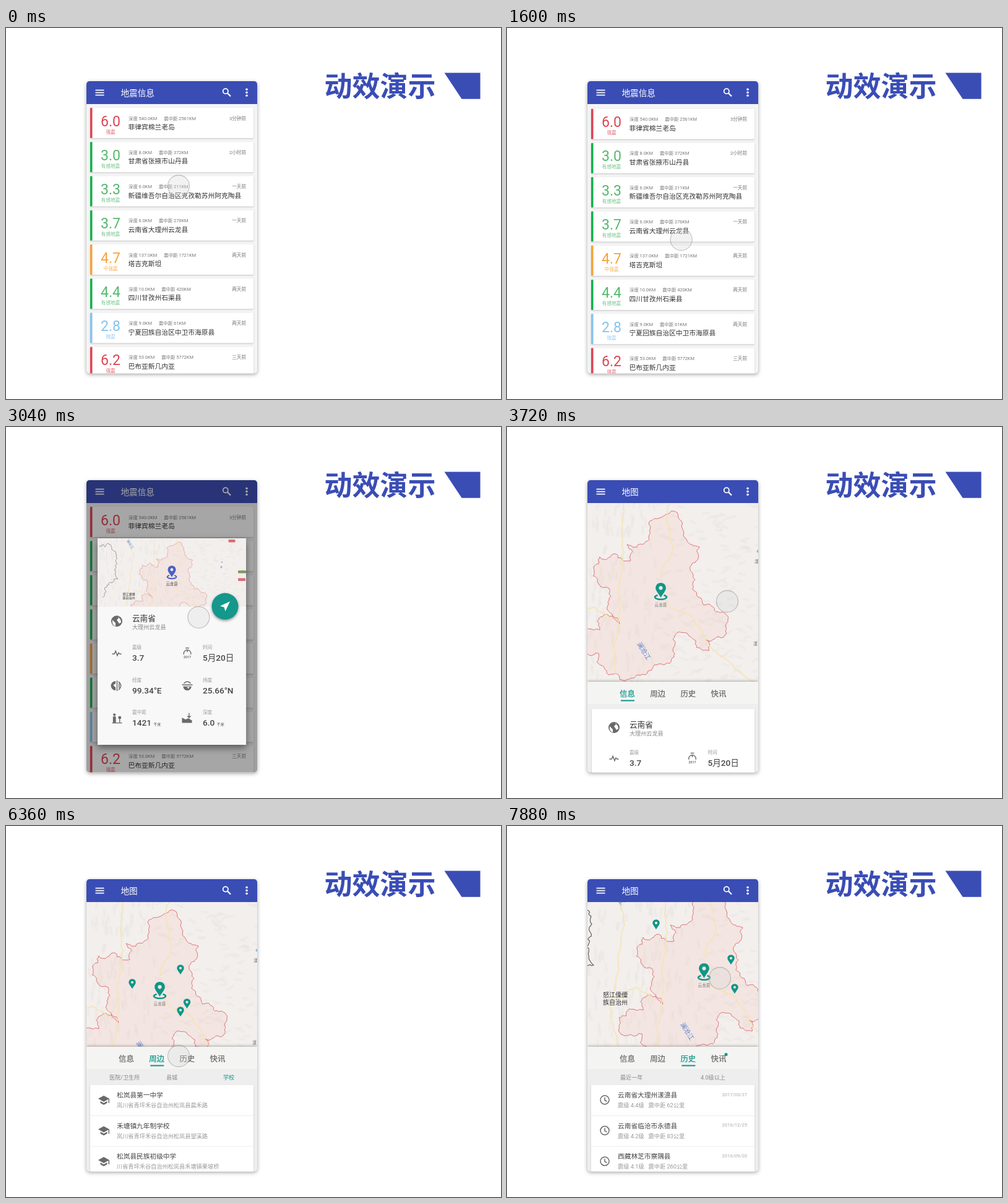
An HTML page for the animation above (8 s loop, 800 by 600 pixels).

```html
<!DOCTYPE html>
<html lang="zh-CN">
<head>
<meta charset="utf-8">
<style>
html, body { margin: 0; width: 100%; height: 100%; overflow: hidden; background: #fff; }
svg { display: block; width: 800px; height: 600px; font-family: Roboto, "Noto Sans CJK SC", "Noto Sans CJK", sans-serif; }
.card { fill: #fff; filter: drop-shadow(0 1px 1px rgba(0,0,0,.2)); }
</style>
</head>
<body>
<svg id="stage" viewBox="0 0 800 600"></svg>
<script>
const INDIGO = '#3a4db5', TEAL = '#0f9687', GRAY = '#6a6a6a';
const RED = '#dd4452', GREEN = '#12b04c', ORANGE = '#f4a33c', BLUE = '#86c3ee';

let seed = 7;
const rnd = () => (seed = seed * 16807 % 2147483647) / 2147483647;
const spread = n => (rnd() - .5) * n;

// ---- markup helpers ----
const text = (x, y, s, size, fill, weight = 400, anchor = 'start', extra = '') =>
  `<text x="${x}" y="${y}" font-size="${size}" fill="${fill}" font-weight="${weight}" text-anchor="${anchor}" ${extra}>${s}</text>`;
const rect = (x, y, w, h, fill, extra = '') =>
  `<rect x="${x}" y="${y}" width="${w}" height="${h}" fill="${fill}" ${extra}/>`;
const circle = (x, y, r, fill, extra = '') => `<circle cx="${x}" cy="${y}" r="${r}" fill="${fill}" ${extra}/>`;
const path = (d, fill, extra = '') => `<path d="${d}" fill="${fill}" ${extra}/>`;
const line = (d, color, w = 1, extra = '') => path(d, 'none', `stroke="${color}" stroke-width="${w}" ${extra}`);
const at = (x, y, body, s = 1) => `<g transform="translate(${x} ${y}) scale(${s})">${body}</g>`;
const group = (id, body) => `<g id="${id}">${body}</g>`;
const times = (n, make) => Array.from({ length: n }, (_, i) => make(i)).join('');

// Jagged line through a few points, by midpoint displacement
function rough(str, bend = .22) {
  const pts = str.split(' ').map(s => s.split(',').map(Number));
  const split = ([ax, ay], [bx, by]) => {
    const dx = bx - ax, dy = by - ay;
    if (Math.hypot(dx, dy) < 5) return `L${bx.toFixed(1)},${by.toFixed(1)}`;
    const k = spread(bend), mid = [(ax + bx) / 2 - dy * k, (ay + by) / 2 + dx * k];
    return split([ax, ay], mid) + split(mid, [bx, by]);
  };
  return 'M' + pts[0] + pts.slice(1).map((p, i) => split(pts[i], p)).join('');
}

// ---- earthquake list ----
const quakes = [
  ['6.0', '强震', RED, '540.0', 2561, '3分钟前', '菲律宾棉兰老岛'],
  ['3.0', '有感地震', GREEN, '8.0', 372, '2小时前', '甘肃省张掖市山丹县'],
  ['3.3', '有感地震', GREEN, '6.0', 211, '一天前', '新疆维吾尔自治区克孜勒苏州阿克陶县'],
  ['3.7', '有感地震', GREEN, '6.0', 276, '一天前', '云南省大理州云龙县'],
  ['4.7', '中强震', ORANGE, '137.0', 1721, '两天前', '塔吉克斯坦'],
  ['4.4', '有感地震', GREEN, '10.0', 420, '两天前', '四川甘孜州石渠县'],
  ['2.8', '微震', BLUE, '9.0', 61, '两天前', '宁夏回族自治区中卫市海原县'],
  ['6.2', '强震', RED, '53.0', 5772, '三天前', '巴布亚新几内亚']
];
const quakeCard = ([mag, kind, color, depth, dist, ago, place], i) => {
  const ink = color === GREEN ? '#55ba6e' : color;
  return at(0, 129 + i * 55.25,
    rect(136, 0, 264, 49, '#fff', 'class="card" rx="1"') + rect(136, 0, 3.5, 49, color, 'rx="1"') +
    text(169, 29.5, mag, 23, ink, 400, 'middle') + text(169, 41.5, kind, 7.6, ink, 400, 'middle', 'opacity=".85"') +
    text(198, 19.5, `深度 ${depth}KM<tspan dx="11">震中距 ${dist}KM</tspan>`, 7.4, '#777') +
    text(388, 19.5, ago, 7.6, '#777', 400, 'end') + text(197.5, 35.2, place, 10.75, '#333', 500));
};

// ---- map ----
const county = '270,136 282,152 285,168 311,194 296,232 318,288 357,311 350,340 322,344 326,362 296,339 273,335 ' +
  '270,372 230,394 190,411 145,380 148,366 111,363 111,340 150,328 146,314 154,307 182,318 168,274 146,250 ' +
  '150,210 200,216 194,190 229,178 231,152 262,140 270,136';
const roads = ['183,90 184,240 176,400', '108,90 110,250 106,410', '262,90 268,200 249,243',
  '255,284 300,308 325,350 420,415', '100,312 140,291 168,312'];
const relief = () => {
  const ridge = () => {
    const x = rnd() * 500, y = 90 + rnd() * 350;
    const [dx, dy] = x < 240 ? [spread(6), 14] : [11, spread(14)];
    return `M${x},${y}q${spread(8)},${spread(8)} ${dx},${dy}`;
  };
  return line(times(600, ridge), '#85796c', 2, 'opacity=".075" style="filter:blur(.8px)"');
};
const river = (x, y) => text(0, 0, '澜沧江', 10.5, '#5a83cf', 400, 'middle', `transform="translate(${x} ${y}) rotate(58)"`);
const mapArt = rect(-50, 50, 600, 450, '#f2efed') + relief() +
  path(rough(county, .5), 'rgba(243,184,170,.19)', 'stroke="#dc6064" stroke-width=".85"') +
  roads.map(r => line(rough(r), '#f7e4b2', 2, 'opacity=".8"')).join('') +
  line(rough('8,150 66,176 58,225 70,255 20,315', .7), '#555', 1.1) +
  text(85, 307, '怒江傈僳', 10, '#333') + text(85, 319, '族自治州', 10, '#333') +
  river(218, 364) + river(106, 145) + circle(406, 201, 2.5, '#8fbce8') +
  text(400, 220, '漾', 7, GRAY) + text(398, 353, '漾', 7, GRAY) +
  rect(427, 128, 22, 9, '#dd6b72', 'rx="2"') + rect(458, 253, 24, 9, '#dd6b72', 'rx="2"') + rect(458, 228, 26, 9, '#7d9a62', 'rx="2"');

const drop = c => path('M0,8C-3,3 -6,0 -6,-3A6,6 0 0 1 6,-3C6,0 3,3 0,8ZM0,-5.2A2.2,2.2 0 1 0 0,-.8A2.2,2.2 0 0 0 0,-5.2Z', c, 'fill-rule="evenodd"');
const bigPin = c => line('M-5,7.5C-14,10 -8,14.3 0,14.3S14,10 5,7.5', c, 2.5) + at(0, 0, drop(c), 1.4);
const pins = (...list) => list.map(([x, y]) => at(x, y + .7, drop(TEAL), .95)).join('');

// ---- icons, centred on 0,0 ----
const stroke = (d, w = 1.5) => line(d, GRAY, w);
const icons = {
  globe: circle(0, 0, 9, GRAY) + path('M-7,-2L-2,3V8Q-8,6 -7,-2ZM1,-7L4,-6 0,-2 4,4 7,2Q7,-4 1,-7Z', '#fff'),
  pulse: stroke('M-8,1H-4L-2,-4 1,4 3,-1 5,1H8'),
  watch: stroke('M-6,2A6.2,6.2 0 1 1 6,2M0,-2V-6M-3,-9H3') + text(0, 8, '2017', 5.5, GRAY, 700, 'middle'),
  lon: path('M-2,-8A8,8 0 0 0 -2,8V3L-6,-1 -2,-4Z', GRAY) + stroke('M.5,-9V9M3,-7Q11,0 3,7M4,-4V4'),
  lat: path('M-7,1H7A7,7 0 0 1 -7,1ZM-1,2L2,5 4,2Z', GRAY, 'fill-rule="evenodd"') + stroke('M-9,-1.5H9M-6,-4Q0,-10 6,-4'),
  people: circle(-4, -6, 2.2, GRAY) + rect(-6.5, -3, 5, 11, GRAY) + circle(5, -1, 2.6, GRAY) + stroke('M5,0V7M-8,8H9'),
  deep: path('M-9,8V-1L-3,2 2,0 8,4V8Z', GRAY) + stroke('M3,-9V-2M0,-4L3,-1 6,-4'),
  cap: path('M0,-7L9,-2 0,3 -9,-2ZM-5.5,2L0,5 5.5,2V5L0,8 -5.5,5Z', GRAY) + stroke('M8.3,-2V5'),
  clock: circle(0, 0, 7, 'none', `stroke="${GRAY}" stroke-width="1.5"`) + stroke('M0,-4V.5L3.5,2.5')
};
const km = n => `${n} <tspan font-size="6">千米</tspan>`;
const facts = [
  ['pulse', '震级', '3.7'], ['watch', '时间', '5月20日'], ['lon', '经度', '99.34°E'],
  ['lat', '纬度', '25.66°N'], ['people', '震中距', km(1421)], ['deep', '深度', km('6.0')]
];
const details = (x, y, gap, pitch, col) => at(x - 25, y, icons.globe) +
  text(x, y, '云南省', 12.6, '#333', 500) + text(x, y + 12.5, '大理州云龙县', 9.1, '#888') +
  facts.map(([icon, label, value], i) => {
    const fx = x + i % 2 * col, fy = y + gap + (i >> 1) * pitch;
    return at(fx - 25, fy + 7, icons[icon], .95) + text(fx, fy, label, 7.6, '#999') + text(fx, fy + 19, value, 13.6, '#444', 500);
  }).join('');

// ---- bottom panel, y measured from its top ----
const tabs = ['信息', '周边', '历史', '快讯'], TAB_W = 49.2;
const sub = (x, s, fill = '#888') => text(x, 53, s, 9.1, fill);
const rows = (icon, list) => rect(136, 62, 264, 300, '#fff', 'class="card"') +
  list.map(([title, note, date = ''], i) => at(0, 62 + i * 49.6,
    at(158, 24, icons[icon]) + text(179, 20, title, 10.7, '#444', 500) + text(179, 36, note, 9.2, '#999') +
    text(388, 17.5, date, 7.6, '#aaa', 400, 'end') + rect(136, 49, 264, 1, '#eee'))).join('');
const past = (mag, dist) => `震级 ${mag}级<tspan dx="7">震中距 ${dist}公里</tspan>`;
const pages = [
  rect(137, 44, 263, 400, '#fff', 'class="card"') + details(198, 74, 43, 46, 126.5),
  sub(167, '医院/卫生所') + sub(259, '县城') + sub(351, '学校', TEAL) + rows('cap', [
    ['松岚县第一中学', '岚川省青坪禾谷自治州松岚县晨禾路'],
    ['禾塘镇九年制学校', '岚川省青坪禾谷自治州松岚县望溪路'],
    ['松岚县民族初级中学', '川省青坪禾谷自治州松岚县禾塘镇栗坡桥']
  ]),
  sub(183, '最近一年') + sub(313, '4.0级以上') + rows('clock', [
    ['云南省大理州漾濞县', past('4.4', 62), '2017/03/27'],
    ['云南省临沧市永德县', past('4.2', 83), '2016/12/25'],
    ['西藏林芝市察隅县', past('4.1', 260), '2016/09/20']
  ])
];
const panel = rect(130, 0, 276, 300, '#efeeee', 'style="filter:drop-shadow(0 -1px 2px rgba(0,0,0,.3))"') +
  group('pages', pages.map((p, i) => at(i * 276, 0, p)).join('')) + rect(130, 0, 276, 36, '#f4f4f3') +
  tabs.map((s, i) => text(182 + i * TAB_W, 23.5, s, 12.4, GRAY, 500, 'start',
    `id="tab${i}" stroke-width=".25"`)).join('') +
  rect(184, 29.5, 22, 2, TEAL, 'id="mark"') + circle(354, 12.5, 2.5, TEAL, 'id="dot"');

// ---- dialog ----
const dialog = rect(148, 180, 240, 334, '#f8f8f8', 'style="filter:drop-shadow(0 5px 6px rgba(0,0,0,.45))"') +
  `<g clip-path="url(#dlgClip)"><use href="#mapArt" transform="translate(146 118) scale(.5)"/></g>` +
  at(268, 234, bigPin('#4c5fc4'), .78) + text(268, 255.5, '云龙县', 6.4, '#444', 400, 'middle') +
  details(204, 314, 45, 52.5, 114) +
  circle(354, 290, 21.5, '#13988b', 'style="filter:drop-shadow(0 2px 2px rgba(0,0,0,.4))"') +
  path('M362,282L346,289.5 352.5,291.5 354.5,298Z', '#fff');

const title = (id, s) => text(185.5, 109.5, s, 13.6, '#fff', 500, 'start', `id="${id}"`);
const header = rect(130, 86, 276, 37, INDIGO) + title('titleList', '地震信息') + title('titleMap', '地图') +
  times(3, i => rect(144.5, 99.7 + 4 * i, 14, 1.7, '#fff') + circle(389, 99.3 + 5 * i, 1.8, '#fff')) +
  circle(354.8, 102.3, 4.1, 'none', 'stroke="#fff" stroke-width="1.8"') + line('M357.8,105.3L363,110.5', '#fff', 2.2);

document.getElementById('stage').innerHTML =
  `<defs><clipPath id="phone">${rect(130, 86, 276, 472.5, '#000', 'rx="5"')}</clipPath>
   <clipPath id="dlgClip">${rect(148, 180, 240, 110.5, '#000')}</clipPath>${group('mapArt', mapArt)}</defs>` +
  text(514.5, 111, '动效演示', 45, INDIGO, 700) + path('M708.5,72.5H766.5V114.7H736.5Z', INDIGO) +
  rect(130, 86, 276, 472.5, '#f4f4f4', 'rx="5" style="filter:drop-shadow(0 2px 3px rgba(0,0,0,.35))"') +
  `<g clip-path="url(#phone)">` + group('list', quakes.map(quakeCard).join('')) +
  group('map', '<use href="#mapArt"/>' +
    at(248.5, 264.5, bigPin(TEAL)) + text(248.5, 290, '云龙县', 6.6, '#777', 400, 'middle') +
    group('near', pins([204, 255], [282, 232], [292.5, 287], [282, 300])) +
    group('hist', pins([171, 189], [292, 246], [298, 293]))) +
  header + rect(130, 86, 276, 473, '#0a0a0a', 'id="dim"') + group('dialog', dialog) + group('panel', panel) +
  '</g>' + group('touch', circle(0, 0, 17.5, 'rgba(215,215,215,.33)', 'stroke="rgba(130,130,130,.42)" stroke-width="1.3"'));

// ---- motion ----
const ramp = (t, from, to) => {
  const f = Math.min(1, Math.max(0, (t - from) / (to - from)));
  return f * f * (3 - 2 * f);
};
// each move: start, end, x, y
const moves = [
  [1000, 1420, 282, 344], [1420, 2320, 278, 327], [2680, 3480, 356, 282], [4120, 4340, 245, 427],
  [4340, 4720, 245, 372], [6120, 6340, 279, 372], [6960, 7180, 274, 276], [7180, 7840, 344, 246]
];
const finger = t => moves.reduce(([x, y], [from, to, nx, ny]) => {
  const f = ramp(t, from, to);
  return [x + (nx - x) * f, y + (ny - y) * f];
}, [279, 255.5]);
const taps = [1950, 3440, 5140, 6460];

const el = id => document.getElementById(id);
const move = (id, x, y, s = 1) => el(id).setAttribute('transform', `translate(${x} ${y}) scale(${s})`);
const fade = (id, v) => {
  el(id).setAttribute('opacity', v);
  el(id).style.display = v > 0 ? '' : 'none';
};

function draw(t) {
  const press = Math.max(0, ...taps.map(p => 1 - Math.abs(t - p) / 100));
  move('touch', ...finger(t), 1 - .12 * press);
  move('list', 0, 24 * (ramp(t, 1000, 1400) - ramp(t, 1400, 1640)));

  const open = ramp(t, 2040, 2340), page = ramp(t, 3500, 3710), s = .88 + .12 * open;
  fade('dim', .36 * open * (1 - page));
  fade('dialog', open * (1 - page));
  move('dialog', 268 * (1 - s), 347 * (1 - s), s);
  fade('map', page);
  fade('titleMap', page);
  fade('titleList', 1 - page);
  fade('panel', page > 0 ? 1 : 0);
  move('panel', 0, 560 - 148 * page - 55 * ramp(t, 4340, 4720));

  const tab = ramp(t, 5240, 5520) + ramp(t, 6520, 6820);
  move('pages', -276 * tab, 0);
  move('mark', TAB_W * tab, 0);
  tabs.forEach((_, i) => {
    const color = i === Math.round(tab) ? TEAL : GRAY;
    el('tab' + i).setAttribute('fill', color);
    el('tab' + i).setAttribute('stroke', color);
  });
  fade('near', 1 - Math.abs(tab - 1));
  fade('hist', Math.max(0, tab - 1));
  fade('dot', Math.max(0, tab - 1));

  const drag = ramp(t, 7180, 7840);
  move('map', 70 * drag, -30 * drag);
}
(function loop() {
  draw(performance.now() % 8000);
  requestAnimationFrame(loop);
})();
</script>
</body>
</html>
```
